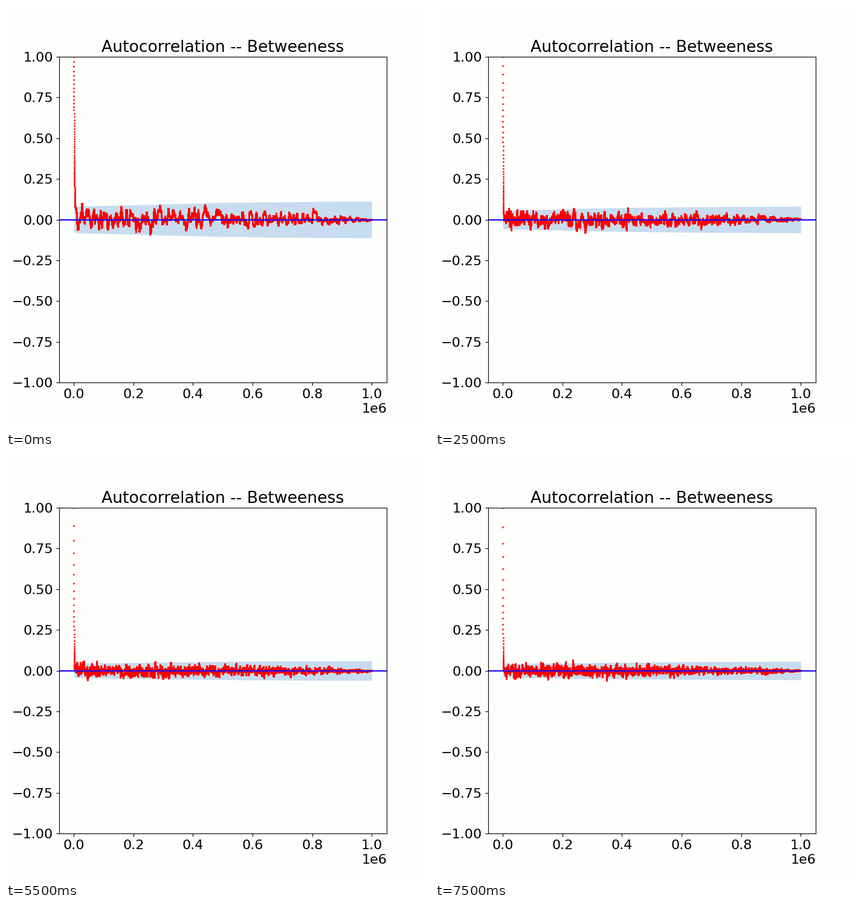
A matplotlib script that plays this animation: 700x700 px, repeating every 8 s.

```python
import matplotlib.pyplot as plt
import numpy as np
from matplotlib.animation import FuncAnimation

SAMPLES = 20000
STEP = 50
LAGS = np.arange(SAMPLES)
TAPER = np.sqrt(1 - LAGS / SAMPLES)

# Each group of four charts eases from a slow to a fast decay:
# (first lag-one correlation, last one, stretch of the decay).
GROUPS = [(0.970, 0.926, 1.0), (0.968, 0.909, 0.98),
          (0.967, 0.888, 0.92), (0.961, 0.880, 0.935)]

BACKGROUND = "#fdfffd"
BAND = "#c8dcef"
LINE = "#1a00f0"


def autocorrelation(index):
    """Sample autocorrelation: stretched decay plus tapering noise."""
    group, position = divmod(index, 4)
    first, last, stretch = GROUPS[group]
    ease = 1 - (1 - position / 3) ** 1.35
    phi = first + (last - first) * ease

    ring = np.arange(2 * SAMPLES)
    ring = np.minimum(ring, 2 * SAMPLES - ring)
    kernel = phi ** (ring ** stretch)
    decay = kernel[:SAMPLES]

    # Noise shares the decay's correlation and, in total, its energy.
    white = np.random.default_rng(100 + index).standard_normal(2 * SAMPLES)
    spectrum = np.fft.rfft(white) * np.fft.rfft(kernel).real
    noise = np.fft.irfft(spectrum)[:SAMPLES] * TAPER
    noise *= np.sqrt(np.sum(decay[1:] ** 2) / np.sum(noise ** 2))
    return decay + noise * (1 - decay) ** 2


def confidence(acf):
    """Bartlett's 95 % half width for lags 1 and up."""
    total = np.concatenate([[0], np.cumsum(acf[1:-1] ** 2)])
    return 1.96 * np.sqrt((1 + 2 * total) / SAMPLES)


plt.rcParams["font.family"] = "DejaVu Sans"
plt.rcParams["font.size"] = 16
fig, ax = plt.subplots(figsize=(7, 7), dpi=100, facecolor=BACKGROUND)


def draw(index):
    acf = autocorrelation(index)
    half = confidence(acf)
    x = LAGS * STEP
    ax.clear()
    ax.set_facecolor(BACKGROUND)
    ax.fill_between(x[1:], -half, half, color=BAND, linewidth=0)
    ax.plot(x, acf, "o", color="red", markersize=1)
    ax.axhline(0, color=LINE)
    ax.set_xlim(-50000, 1050000)
    ax.set_ylim(-1, 1)
    ax.set_title("Autocorrelation -- Betweeness")


anim = FuncAnimation(fig, draw, frames=16, interval=500, init_func=lambda: None,
                     repeat=True, repeat_delay=0)
plt.show()
```
